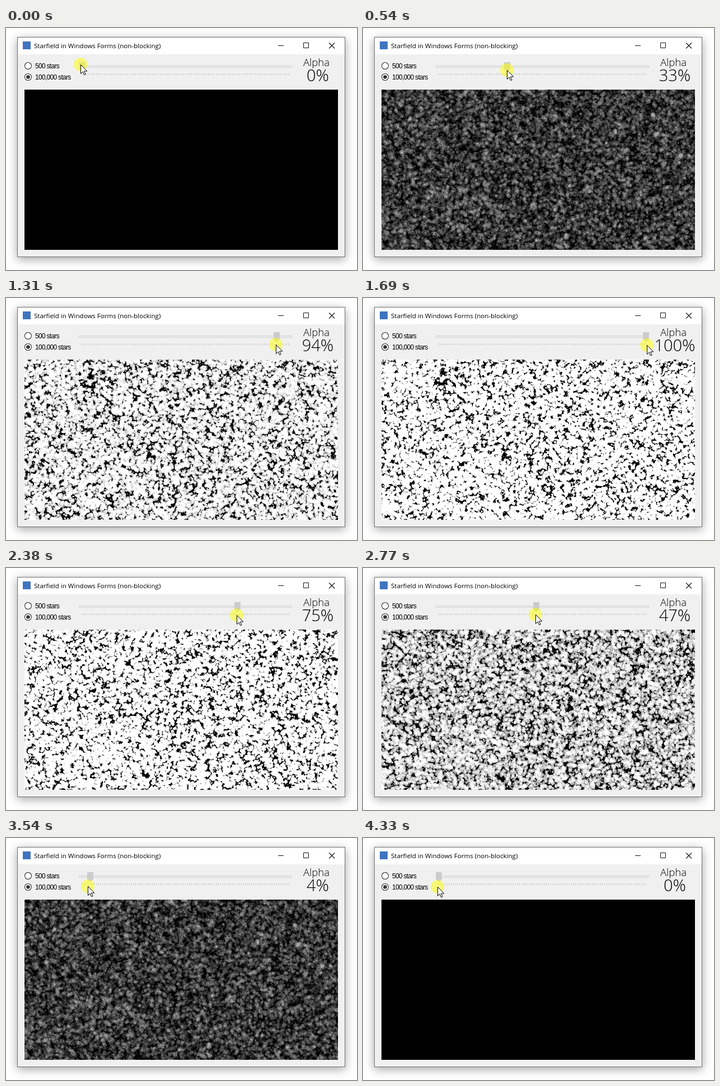
Animation, 627 px wide and 432 px high, one loop 4.71 s. Source, as an HTML page with a canvas:

```html
<!DOCTYPE html>
<html lang="en">
<head>
<meta charset="utf-8">
<title>Starfield</title>
<style>
  html, body { margin: 0; width: 100%; height: 100%; overflow: hidden; background: #fff; }
  #stage { position: absolute; left: 0; top: 0; width: 627px; height: 432px; overflow: hidden; }
  #window {
    position: absolute; left: 20px; top: 16px; width: 584px; height: 391px;
    border: 1px solid #707070;
    background: linear-gradient(#fff 30px, #f0f0f0 30px);
    box-shadow: 0 4px 16px rgba(0, 0, 0, .36);
  }
  canvas { position: absolute; left: 33px; top: 110px; background: #000; }
  svg { position: absolute; left: 0; top: 0; }
  .ui { font-family: "Open Sans", sans-serif; }
  .large { font-weight: 350; }
  .option { font: 12px "Liberation Sans", Arial, sans-serif; letter-spacing: -.7px; }
</style>
</head>
<body>
<div id="stage">
  <div id="window"></div>
  <canvas id="field" width="560" height="286"></canvas>
  <svg width="627" height="432" viewBox="0 0 627 432">
    <rect x="30" y="24" width="14" height="14" fill="#3f74c0"/>
    <text class="ui" x="50" y="36" font-size="11.55">Starfield in Windows Forms (non-blocking)</text>
    <g fill="none" stroke="#111">
      <path d="M486 31.5h10M531.5 26.5h9v9h-9z"/>
      <path d="M577 26.5l10 10m0-10l-10 10" stroke-width="1.1"/>
    </g>

    <g fill="#fff" stroke="#333" stroke-width="1.1">
      <circle cx="39.5" cy="67.5" r="6"/>
      <circle cx="39.5" cy="87.5" r="6"/>
    </g>
    <circle cx="39.5" cy="87.5" r="3.3" fill="#333"/>
    <text class="option" x="52" y="72">500 stars</text>
    <text class="option" x="52" y="92">100,000 stars</text>

    <rect x="130.5" y="67.5" width="380" height="3" fill="#e7eaea" stroke="#d6d6d6"/>
    <path id="ticks" stroke="#c0c0c0"/>
    <path id="thumb" d="M0 61h11v12.5l-5.5 5l-5.5-5z" fill="#ccc"/>

    <g class="ui large" text-anchor="middle">
      <text x="554.5" y="68" font-size="18.5">Alpha</text>
      <text id="percent" x="557" y="95" font-size="29">0%</text>
    </g>

    <g id="pointer">
      <circle r="12" fill="#ff0" fill-opacity=".5"/>
      <path d="M.5 .5v16l3.7-3.6l2.5 5.8l2.4-1l-2.5-5.7h5.2z" fill="#fff" stroke="#000"/>
    </g>
  </svg>
</div>
<script>
const LOOP = 4710, TICK = 1000 / 13;
const LAG = 3;        // ticks by which the star field trails the slider
const STARS = 36000;

// tick, percent, pointer x, pointer y
const STEPS = [
  [0, 0, 133, 65], [2, 3, 144, 67], [6, 26, 229, 74], [11, 63, 367, 80],
  [15, 89, 464, 82], [19, 98, 500, 83], [21, 100, 506, 84], [22, 100, 507, 84],
  [26, 100, 507, 84], [27, 97, 495, 84], [28, 95, 486, 84], [31, 75, 412, 84],
  [40, 25, 224, 83], [46, 4, 146, 86], [47, 2, 139, 86], [49, 2, 138, 86],
  [51, 0, 133, 87], [62, 0, 133, 87]
];

const byId = id => document.getElementById(id);
const thumb = byId('thumb'), percent = byId('percent'), pointer = byId('pointer');
const canvas = byId('field'), ctx = canvas.getContext('2d');
const W = canvas.width, H = canvas.height;
const image = ctx.createImageData(W, H);
const pixels = new Uint32Array(image.data.buffer);
const dark = new Float32Array(W * H);

byId('ticks').setAttribute('d', Array.from({ length: 101 },
  (_, i) => `M${Math.round(135 + i * 3.7) + .5} 81v3`).join(''));

function seeded(seed) {
  return () => {
    seed = seed + 0x6D2B79F5 | 0;
    let v = Math.imul(seed ^ seed >>> 15, 1 | seed);
    v = v + Math.imul(v ^ v >>> 7, 61 | v) ^ v;
    return ((v ^ v >>> 14) >>> 0) / 4294967296;
  };
}

// Mostly fine stars with a few large ones.
const random = seeded(42);
const stars = Array.from({ length: STARS }, () => ({
  x: (random() - .5) * (W + 8),
  y: (random() - .5) * (H + 8),
  radius: .5 + 3.5 * random() ** 2,
  phase: random()
}));

function poseAt(tick) {
  if (tick <= 0) return STEPS[0].slice(1);
  const i = Math.max(1, STEPS.findIndex(step => step[0] >= tick));
  const a = STEPS[i - 1], b = STEPS[i];
  const k = (tick - a[0]) / (b[0] - a[0]);
  return a.slice(1).map((v, n) => v + (b[n + 1] - v) * k);
}

// Each star covers its disc with translucent white and lets 1 - alpha through.
function stamp(cx, cy, radius, alpha) {
  const reach = radius + .5;
  const x0 = Math.max(0, Math.floor(cx - reach)), x1 = Math.min(W - 1, Math.ceil(cx + reach));
  const y0 = Math.max(0, Math.floor(cy - reach)), y1 = Math.min(H - 1, Math.ceil(cy + reach));
  for (let y = y0; y <= y1; y++) {
    for (let x = x0; x <= x1; x++) {
      const cover = reach - Math.sqrt((x - cx) ** 2 + (y - cy) ** 2);
      if (cover > 0) dark[y * W + x] *= 1 - alpha * Math.min(1, cover);
    }
  }
}

function drawField(tick, alpha) {
  dark.fill(1);
  if (alpha > 0) {
    for (const s of stars) {
      const scale = 1 + .5 * ((s.phase + tick / 40) % 1);
      stamp(W / 2 + s.x * scale, H / 2 + s.y * scale, s.radius, alpha);
    }
  }
  for (let i = 0; i < dark.length; i++) {
    const v = Math.round(255 * (1 - dark[i]));
    pixels[i] = 0xff000000 | v << 16 | v << 8 | v;
  }
  ctx.putImageData(image, 0, 0);
}

function draw(tick) {
  const [value, x, y] = poseAt(tick);
  const shown = Math.round(value);
  percent.textContent = shown + '%';
  thumb.setAttribute('transform', `translate(${Math.round(130 + shown * 3.7)})`);
  pointer.setAttribute('transform', `translate(${Math.round(x)} ${Math.round(y)})`);

  // The stars rest while the slider waits at the far end.
  const drift = tick >= 24 && tick < 27 ? 24 : tick;
  drawField(drift, tick < 51 ? poseAt(tick - LAG)[0] / 100 : 0);
}

const start = performance.now();
let lastTick = -1;
function frame() {
  const time = (performance.now() - start) % LOOP;
  const tick = Math.floor((time + 6) / TICK);
  if (tick !== lastTick) draw(lastTick = tick);
  requestAnimationFrame(frame);
}
frame();
</script>
</body>
</html>
```
